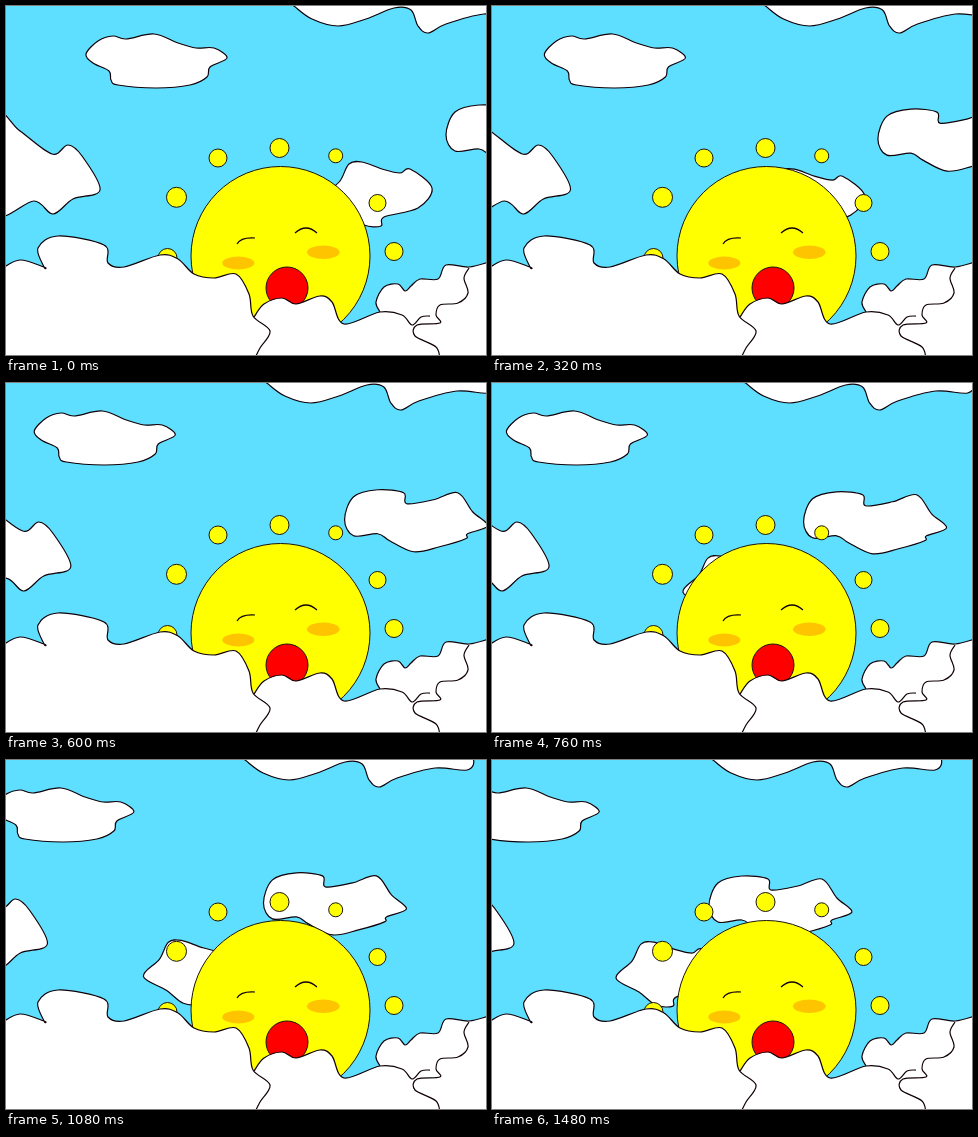
An HTML page that plays this animation: 480 px wide and 349 px high, repeating every 1560 ms.

```html
<!DOCTYPE html>
<html lang="en">
<head>
<meta charset="utf-8">
<title>Sun among clouds</title>
<style>
  @property --step { syntax: "<number>"; inherits: true; initial-value: 0; }
  html, body { margin: 0; width: 100%; height: 100%; overflow: hidden; background: #5fdfff; }
  svg { display: block; width: 480px; height: 349px; }
  .ink { stroke: #100008; stroke-width: 1.2; fill: none; }
  .white { fill: #fff; }
  .sun { stroke: #1a140c; stroke-width: 1; fill: #ff0; }
  /* 37 steps of 40 ms; the last pose is held for 80 ms */
  #sky { animation: drift 1560ms infinite; }
  @keyframes drift {
    0% { --step: 0; animation-timing-function: steps(37, end); }
    94.8718%, 100% { --step: 37; }
  }
  .cloud {
    --n: min(var(--step), var(--stop));
    transform: translate(calc(var(--n) * var(--dx) * 1px), calc(var(--n) * var(--dy) * 1px));
  }
</style>
</head>
<body>
<svg viewBox="0 0 480 349">
  <g id="sky"></g>
  <g class="sun">
    <circle cx="274.5" cy="250" r="89.5"/>
    <circle cx="161.5" cy="252" r="9.5"/>
    <circle cx="170.5" cy="191.3" r="10"/>
    <circle cx="212" cy="152" r="9"/>
    <circle cx="273.5" cy="142" r="9.5"/>
    <circle cx="329.7" cy="149.8" r="7"/>
    <circle cx="371.5" cy="197" r="8.5"/>
    <circle cx="388" cy="245.500" r="9"/>
  </g>
  <g fill="#ffc400">
    <ellipse cx="232.3" cy="257" rx="16" ry="6.5"/>
    <ellipse cx="317.3" cy="246.3" rx="16.3" ry="6.7"/>
  </g>
  <path class="ink" d="M231 238Q235 231 249 232M289 227Q300 217 311 227"/>
  <circle class="sun" cx="281" cy="282" r="21" style="fill:#f00"/>
  <g id="front"></g>
</svg>
<script>
const add = (id, html) => document.getElementById(id).insertAdjacentHTML('beforeend', html);

// Smooth curve through key points "x,y x,y ..."; a doubled point makes a corner.
function curve(text, closed) {
  const p = text.split(' ').map(s => s.split(',').map(Number));
  const n = p.length;
  const at = i => closed ? p[(i + n) % n] : p[Math.max(0, Math.min(n - 1, i))];
  let d = 'M' + p[0];
  for (let i = 0; i < (closed ? n : n - 1); i++) {
    const [a, b, c, e] = [at(i - 1), at(i), at(i + 1), at(i + 2)];
    const c1 = b.map((v, k) => v + (c[k] - a[k]) / 6);
    const c2 = c.map((v, k) => v - (e[k] - b[k]) / 6);
    d += `C${c1} ${c2} ${c}`;
  }
  return d + (closed ? 'Z' : '');
}

// Drifting cloud: pixels per step, and the step at which it stops.
function cloud(dx, dy, stop, points) {
  add('sky', `<path class="ink white cloud" d="${curve(points, true)}"
    style="--dx:${dx};--dy:${dy};--stop:${stop}"/>`);
}

// Outlined bank, filled white down past the bottom edge from x.
function bank(points, x) {
  const d = curve(points);
  add('front', `<path class="white" d="${d}V360H${x}Z"/><path class="ink" d="${d}"/>`);
}

cloud(-1.81, 0, 37, '276,-10 288,0 306,13 332,20 360,13 388,2 405,4 412,20 422,27 440,18 478,8 510,10 516,-2 500,-20');
cloud(-3.45, 0, 33, '80,48 92,35 107,30 120,33 148,28 172,37 190,42 208,42 221,52 204,61 201,71 184,79 150,82 112,79 105,74 103,65 87,57');
cloud(-1.95, 0, 37, '-10,109 14,125 46,148 62,139 76,150 94,184 67,193 47,208 28,195 -10,206');
cloud(-6.69, 0.9, 29, '318,192 334,175 343,158 356,156 376,163 394,167 404,163 426,182 412,202 378,211 375,220 358,219 341,206');
cloud(-6.76, 0.515, 33, '440,129 449,106 473,99 499,102 502,113 529,109 553,102 568,121 583,135 563,143 561,148 535,156 509,161 485,150 473,143 449,145');

bank('374,306 370,296 378,281 392,278 399,285 405,280 414,273 432,273 440,259 463,261 486,255', 374);
bank('248,311 258,298 276,292 290,298 314,290 326,296 338,318 374,306 396,309 406,319 415,311 424,310', 248);
bank('-5,263 14,254 38,261 38,261 32,242 52,230 98,239 102,257 118,261 154,249 172,253 188,268 208,272 230,268 243,288 247,310 264,325 254,342 248,354', -5);
add('front', `<path class="ink" d="${curve('463,262 458,272 462,287 452,297 434,299 430,309 434,317 411,319 409,330 430,341 434,354')}"/>`);
</script>
</body>
</html>
```
